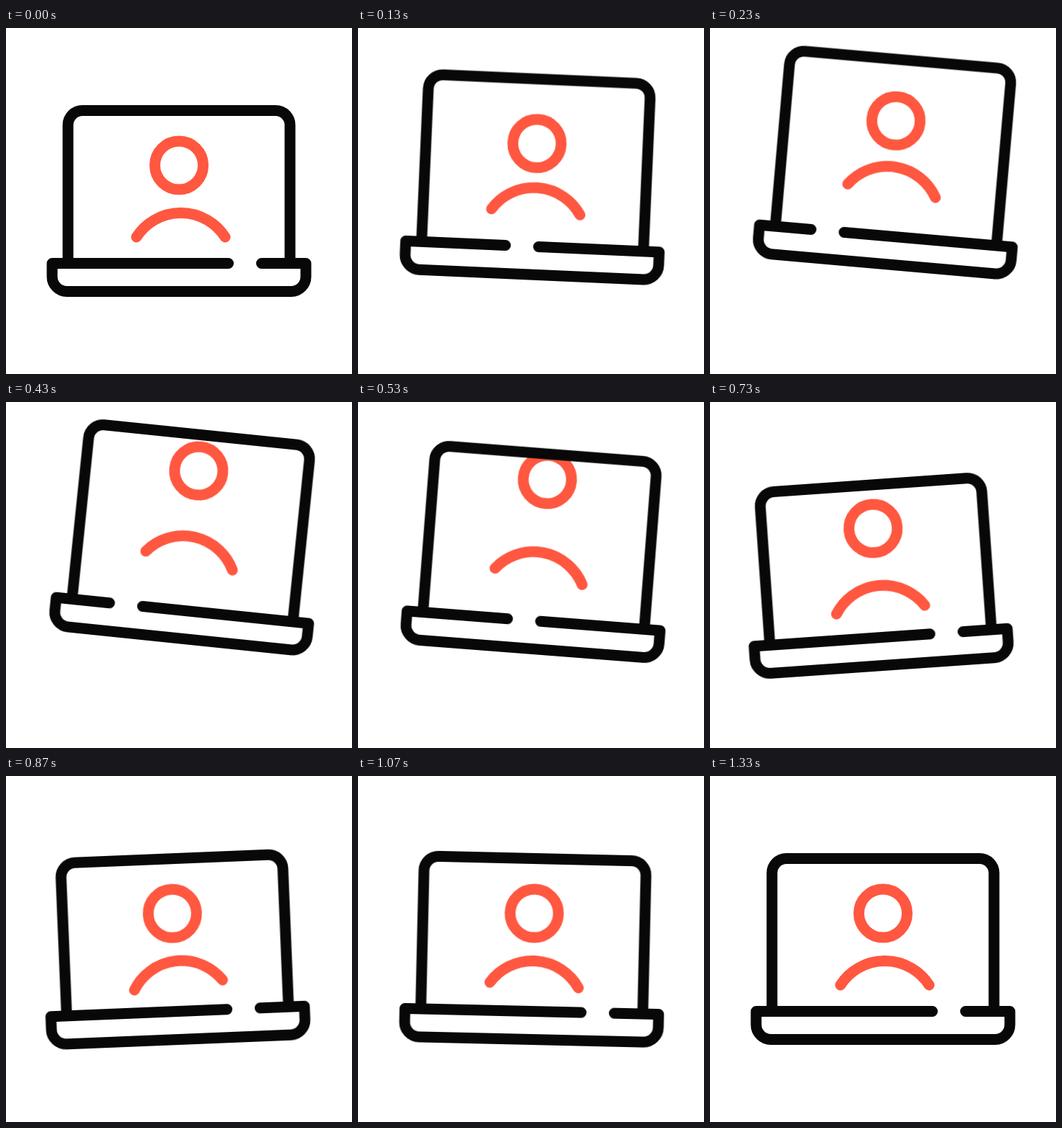
An HTML page that plays this animation: 480 px wide and 480 px high, repeating every 1370 ms.

```html
<!DOCTYPE html>
<html lang="en">
<head>
<meta charset="utf-8">
<title>Laptop hop</title>
<style>
  html, body { margin: 0; width: 100%; height: 100%; overflow: hidden; background: #fff; }
  svg { display: block; width: 100%; height: 100%; }

  path, circle { fill: none; stroke-width: 15; stroke-linecap: round; stroke-linejoin: round; }
  .case { stroke: #080808; }
  .person { stroke: #ff5740; }

  /* Sine-like easing by default; keyframes override it where a part jumps or lands. */
  .all, .all * {
    animation-duration: 1370ms;
    animation-iteration-count: infinite;
    animation-timing-function: cubic-bezier(.37, 0, .63, 1);
  }
  .all { transform-origin: 240px 373px; animation-name: hop, tilt; }
  .screen { animation-name: stretch; }
  .base { stroke-dasharray: 244.5 46 2000; animation-name: gap; }
  .head { animation-name: head-hop, head-sway; }
  .body { transform-origin: 242.5px 287px; animation-name: body-hop, body-tilt; }

  @keyframes hop {
    0% { translate: 0 0; animation-timing-function: cubic-bezier(.33, 0, .3, 1); }
    24.3% { translate: 0 -41.5px; animation-timing-function: cubic-bezier(.55, 0, .75, .75); }
    47%, 100% { translate: 0 0; }
  }
  @keyframes stretch {
    0% {
      d: path("M86 326.5V134.5a20 20 0 0 1 20 -20H374a20 20 0 0 1 20 20V326.5");
      animation-timing-function: cubic-bezier(.33, 0, .3, 1);
    }
    24.3% {
      d: path("M86 326.5V98a20 20 0 0 1 20 -20H374a20 20 0 0 1 20 20V326.5");
      animation-timing-function: cubic-bezier(.55, 0, .75, .75);
    }
    47%, 100% { d: path("M86 326.5V134.5a20 20 0 0 1 20 -20H374a20 20 0 0 1 20 20V326.5"); }
  }
  @keyframes gap {
    0% { stroke-dashoffset: 0; animation-timing-function: cubic-bezier(.33, 0, .3, 1); }
    24.3% { stroke-dashoffset: 188px; animation-timing-function: cubic-bezier(.55, 0, .75, .75); }
    47%, 100% { stroke-dashoffset: 0; }
  }
  @keyframes tilt {
    0% { rotate: 0deg; animation-timing-function: cubic-bezier(.3, 0, .45, 1); }
    26.8% { rotate: 6.1deg; animation-timing-function: cubic-bezier(.5, 0, .8, .6); }
    46% { rotate: 1.5deg; animation-timing-function: cubic-bezier(.3, .4, .6, 1); }
    53.6% { rotate: -4deg; }
    80.3% { rotate: 1.4deg; }
    97%, 100% { rotate: 0deg; }
  }
  @keyframes head-hop {
    0%, 2% { translate: 0 0; }
    36.4% { translate: 0 -62px; animation-timing-function: cubic-bezier(.42, 0, .6, 1); }
    62%, 100% { translate: 0 0; }
  }
  @keyframes head-sway {
    0%, 16.8% { transform: translateX(0); }
    41% { transform: translateX(4px); }
    61% { transform: translateX(-1.8px); }
    80.3% { transform: translateX(.4px); }
    97%, 100% { transform: translateX(0); }
  }
  @keyframes body-hop {
    0% { translate: 0 0; animation-timing-function: cubic-bezier(.35, 0, .52, 1); }
    26.8% { translate: 0 -34.5px; animation-timing-function: cubic-bezier(.45, 0, .65, .9); }
    56.5%, 100% { translate: 0 0; }
  }
  @keyframes body-tilt {
    0% { rotate: 0deg; animation-timing-function: cubic-bezier(.37, 0, .5, 1); }
    34% { rotate: 6.5deg; animation-timing-function: cubic-bezier(.5, 0, .8, .6); }
    46% { rotate: 4.5deg; animation-timing-function: cubic-bezier(.3, .4, .6, 1); }
    61% { rotate: -4.5deg; }
    80.3% { rotate: 2.5deg; }
    97%, 100% { rotate: 0deg; }
  }
</style>
</head>
<body>
<svg viewBox="0 0 480 480">
  <g class="all">
    <g class="person">
      <circle class="head" cx="240" cy="190.5" r="33.5"/>
      <path class="body" d="M181 290A73.2 73.2 0 0 1 304 290"/>
    </g>
    <g class="case">
      <path class="screen" d="M86 326.5V134.5a20 20 0 0 1 20 -20H374a20 20 0 0 1 20 20V326.5"/>
      <path class="base" d="M64 326.5H416V345a20.5 20.5 0 0 1 -20.5 20.5H84.5A20.5 20.5 0 0 1 64 345Z"/>
    </g>
  </g>
</svg>
</body>
</html>
```
